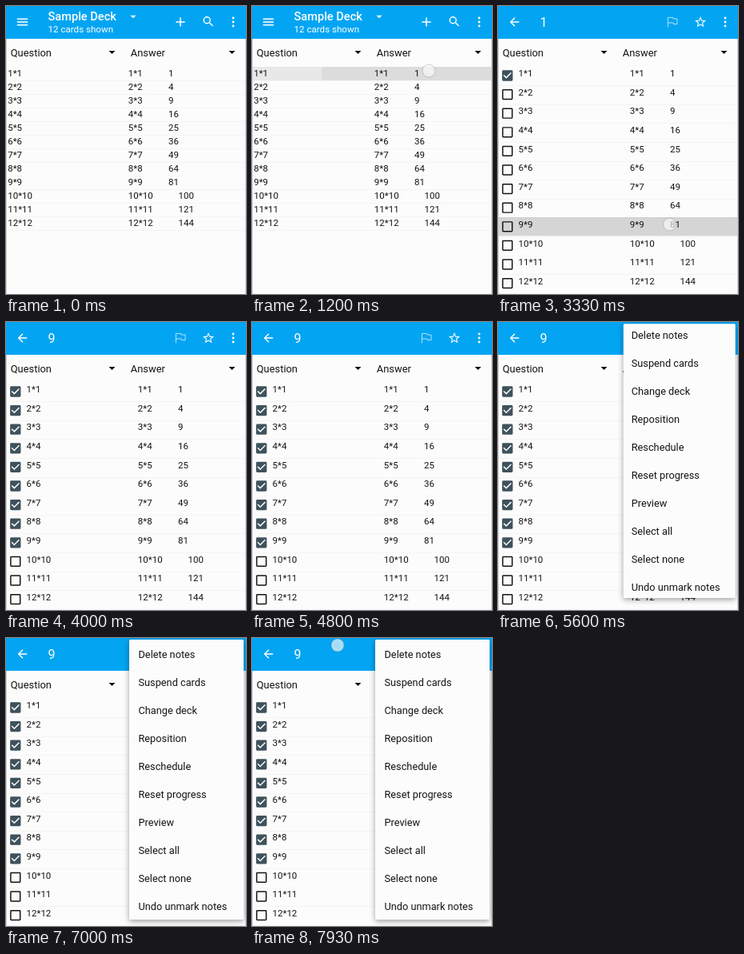
These frames come from a looping animation (300 px wide and 360 px high, 8 s). An HTML page with a canvas:

```html
<!DOCTYPE html>
<html lang="en">
<head>
<meta charset="utf-8">
<title>Card browser</title>
<style>
  html, body { margin: 0; width: 100%; height: 100%; overflow: hidden; background: #fcfcfc; }
  canvas { display: block; width: 300px; height: 360px; }
</style>
</head>
<body>
<canvas id="stage"></canvas>
<script>
const LOOP = 8000;
const WIDTH = 300, HEIGHT = 360, BAR = 41;
const BLUE = '#03a5f3', PAPER = '#fcfcfc', INK = '#141414', SLATE = '#3f525c';

// Moments at which the state changes, in ms
const SELECT_ONE = 1530, SELECT_RANGE = 3530, MENU_OPEN = 5357, MENU_TIME = 300;

const TOUCHES = [
  { x: 221, y: 81, down: 1000, up: 1940 },
  { x: 214.5, y: 273, down: 3000, up: 3740 },
  { x: 284, y: 20, down: 5200, up: 5340 },
  { x: 107, y: 9, down: 7860, up: 8100 }
];

const MENU = { left: 154, top: 2, right: 297, bottom: 352, originX: 284, originY: 19 };
const MENU_ITEMS = ['Delete notes', 'Suspend cards', 'Change deck', 'Reposition', 'Reschedule',
  'Reset progress', 'Preview', 'Select all', 'Select none', 'Undo unmark notes'];

const icons = {
  drawer: 'M3 18h18v-2H3zM3 13h18v-2H3zM3 6v2h18V6z',
  back: 'M20 11H7.83l5.59-5.59L12 4l-8 8 8 8 1.41-1.41L7.83 13H20z',
  add: 'M19 13h-6v6h-2v-6H5v-2h6V5h2v6h6z',
  search: 'M15.5 14h-.79l-.28-.27A6.47 6.47 0 0 0 16 9.5 6.5 6.5 0 1 0 9.5 16c1.61 0 3.09-.59 4.23-1.57l.27.28v.79l5 4.99L20.49 19zM9.5 14A4.5 4.5 0 1 1 9.5 5a4.5 4.5 0 0 1 0 9z',
  flag: 'M4.5 20.5V4.5H13l.6 2.2H20v8.8h-6l-.6-2.2H4.5',
  star: 'M22 9.24l-7.19-.62L12 2 9.19 8.63 2 9.24l5.46 4.73L5.82 21 12 17.27 18.18 21l-1.63-7.03zM12 15.4l-3.76 2.27 1-4.28-3.32-2.88 4.38-.38L12 6.1l1.71 4.04 4.38.38-3.32 2.88 1 4.28z',
  more: 'M10 5a2 2 0 1 0 4 0a2 2 0 1 0-4 0M10 12a2 2 0 1 0 4 0a2 2 0 1 0-4 0M10 19a2 2 0 1 0 4 0a2 2 0 1 0-4 0',
  boxOff: 'M5 3h14q2 0 2 2v14q0 2-2 2H5q-2 0-2-2V5q0-2 2-2zM5 5v14h14V5z',
  boxOn: 'M5 3h14q2 0 2 2v14q0 2-2 2H5q-2 0-2-2V5q0-2 2-2zM10 17l9-9-1.41-1.42L10 14.17l-3.59-3.58L5 12z'
};
for (const name in icons) icons[name] = new Path2D(icons[name]);

const canvas = document.getElementById('stage');
const ctx = canvas.getContext('2d');
const ratio = window.devicePixelRatio || 1;
canvas.width = WIDTH * ratio;
canvas.height = HEIGHT * ratio;

const clamp = v => Math.max(0, Math.min(1, v));
const ramp = (t, start, time) => clamp((t - start) / time);

// Fast-out, slow-in curve: cubic-bezier(.4, 0, .2, 1)
function ease(x) {
  let low = 0, high = 1;
  for (let i = 0; i < 20; i++) {
    const s = (low + high) / 2, u = 1 - s;
    if (1.2 * s * u * u + 0.6 * s * s * u + s ** 3 < x) low = s; else high = s;
  }
  return low * low * (3 - 2 * low);
}

function rect(x, y, w, h, color) {
  ctx.fillStyle = color;
  ctx.fillRect(x, y, w, h);
}

function text(str, x, y, size, color = INK, weight = 400) {
  ctx.font = `${weight} ${size}px Roboto, sans-serif`;
  ctx.fillStyle = color;
  ctx.fillText(str, x, y);
}

function icon(name, x, y, scale, color = '#fff', outline = 0) {
  ctx.save();
  ctx.translate(x, y);
  ctx.scale(scale, scale);
  ctx.translate(-12, -12);
  ctx.fillStyle = ctx.strokeStyle = color;
  ctx.lineWidth = outline;
  if (outline) ctx.stroke(icons[name]);
  else ctx.fill(icons[name], 'evenodd');
  ctx.restore();
}

function arrow(x, y, half, color) {
  ctx.fillStyle = color;
  ctx.beginPath();
  ctx.moveTo(x - half, y - half / 2);
  ctx.lineTo(x + half, y - half / 2);
  ctx.lineTo(x, y + half / 2);
  ctx.fill();
}

function drawBar(count) {
  rect(0, 0, WIDTH, BAR, BLUE);
  if (count) {
    icon('back', 20.5, 20, 0.72);
    text(count, 52.5, 26, 16, '#fff');
    icon('flag', 218, 20, 0.75, 'rgba(255,255,255,.7)', 1.3);
    icon('star', 253, 20, 0.7);
  } else {
    icon('drawer', 20.5, 20, 0.74);
    text('Sample Deck', 52.5, 18.2, 14.6, '#fff', 500);
    text('12 cards shown', 52.5, 33, 11.6, '#fff');
    arrow(159, 13.5, 3.6, '#fff');
    icon('add', 218, 20, 0.8);
    icon('search', 253, 19.5, 0.72);
  }
  icon('more', 284, 20, 0.72);
}

function drawHeadings() {
  text('Question', 5.7, 62.7, 12.9);
  text('Answer', 155.8, 62.7, 12.9);
  arrow(132.5, 58, 4, INK);
  arrow(282.5, 58, 4, INK);
}

function drawRows(count) {
  const step = count ? 23.6 : 17;
  const shift = count ? 12 : 0;
  for (let i = 0; i < 12; i++) {
    const n = i + 1, y = 88.2 + step * i;
    const product = `${n}*${n}`;
    rect(0, Math.round(75.5 + step * n), WIDTH, 1, '#f5f5f5');
    if (count) {
      const on = n <= count;
      icon(on ? 'boxOn' : 'boxOff', 11.8, 87 + step * i, 0.74, on ? SLATE : INK);
    }
    text(product, count ? 25.5 : 2.2, y, 11.5);
    text(product, 152.8 + shift, y, 11.5);
    text(n * n, (n < 10 ? 203 : 215.5) + shift, y, 11.5);
  }
}

// Row tint plus a circle spreading from the finger
function drawPress(t, touch, end, top, height) {
  if (t < touch.down || t >= end) return;
  ctx.save();
  ctx.beginPath();
  ctx.rect(0, top, WIDTH, height);
  ctx.clip();
  rect(0, top, WIDTH, height, `rgba(0,0,0,${0.11 * ramp(t, touch.down + 60, 200)})`);
  ctx.fillStyle = 'rgba(0,0,0,.05)';
  ctx.beginPath();
  ctx.arc(touch.x, touch.y, 20 + 210 * ramp(t, touch.down + 60, 260), 0, 7);
  ctx.fill();
  ctx.restore();
}

function drawEdges() {
  for (const x of [0, WIDTH - 1]) rect(x, BAR, 1, HEIGHT - BAR, '#d0d0d0');
}

function drawMenu(t) {
  if (t < MENU_OPEN) return;
  const p = ramp(t, MENU_OPEN, MENU_TIME);
  const rest = 1 - ease(p);
  const { left, top, right, bottom, originX, originY } = MENU;
  const mix = (a, b) => a + (b - a) * rest;
  const x = mix(left, originX), y = mix(top, originY);
  const w = mix(right, originX) - x, h = mix(bottom, originY) - y;

  ctx.save();
  ctx.globalAlpha = clamp(p * 3);
  ctx.save();
  ctx.shadowColor = 'rgba(0,0,0,.38)';
  ctx.shadowBlur = 7 * ratio;
  ctx.shadowOffsetY = 2 * ratio;
  ctx.fillStyle = PAPER;
  ctx.beginPath();
  ctx.roundRect(x, y, w, h, 1.5);
  ctx.fill();
  ctx.restore();

  ctx.beginPath();
  ctx.rect(x, y, w, h);
  ctx.clip();
  // Contents slide out from the overflow button
  ctx.translate((originX - (left + right) / 2) * rest, (originY - (top + bottom) / 2) * rest);
  MENU_ITEMS.forEach((item, i) => text(item, 165.5, 24.6 + 35 * i, 12.75));
  ctx.restore();
}

function drawTouch(t, { x, y, down, up }) {
  const alpha = ramp(t, down, 50) * (1 - ramp(t, up, 120));
  if (!alpha) return;
  ctx.save();
  ctx.globalAlpha = alpha;
  const glow = ctx.createRadialGradient(x, y, 0, x, y, 8.5);
  glow.addColorStop(0, 'rgba(255,255,255,.6)');
  glow.addColorStop(0.85, 'rgba(245,245,245,.72)');
  glow.addColorStop(1, 'rgba(235,235,235,.5)');
  ctx.fillStyle = glow;
  ctx.strokeStyle = 'rgba(120,120,120,.4)';
  ctx.lineWidth = 0.8;
  ctx.beginPath();
  ctx.arc(x, y, 8, 0, 7);
  ctx.fill();
  ctx.stroke();
  ctx.restore();
}

function draw(t) {
  const count = t < SELECT_ONE ? 0 : t < SELECT_RANGE ? 1 : 9;
  ctx.setTransform(ratio, 0, 0, ratio, 0, 0);
  rect(0, 0, WIDTH, HEIGHT, PAPER);
  drawBar(count);
  drawHeadings();
  drawRows(count);
  drawPress(t, TOUCHES[0], SELECT_ONE, 76, 17);
  drawPress(t, TOUCHES[1], SELECT_RANGE, 264, 23.5);
  drawEdges();
  drawMenu(t);
  TOUCHES.forEach(touch => drawTouch(t, touch));
}

const start = performance.now();
function tick() {
  draw((performance.now() - start) % LOOP);
  requestAnimationFrame(tick);
}
tick();
</script>
</body>
</html>
```
